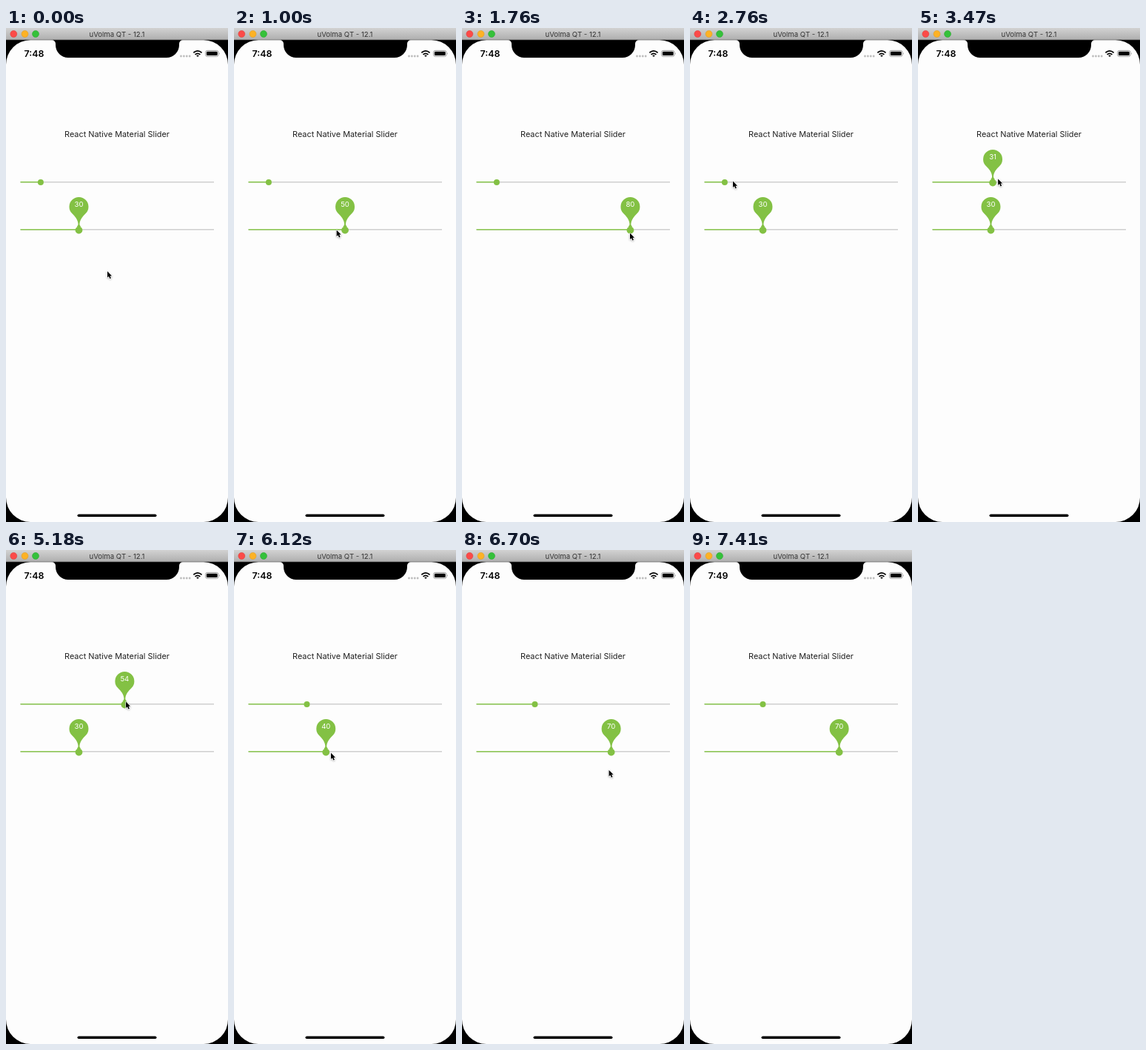
An HTML page for the animation above (8470 ms loop, 300 by 666 pixels).

```html
<!DOCTYPE html>
<html lang="en">
<head>
<meta charset="utf-8">
<title>Slider demo</title>
<style>
  html, body { margin: 0; width: 100%; height: 100%; overflow: hidden; background: #000; }
  svg { display: block; width: 100vw; height: 100vh; }
  text { font-family: Inter, Roboto, sans-serif; text-anchor: middle; }
  .rail { stroke: #cfcfcf; stroke-width: 1.5; }
  .fill { stroke: #8bc751; stroke-width: 1.6; }
  .green { fill: #83c144; }
  .value { font-size: 9.6px; fill: #fff; }
</style>
</head>
<body>
<svg viewBox="0 0 300 666">
  <defs>
    <linearGradient id="bar" x2="0" y2="1">
      <stop offset="0" stop-color="#d2d2d2"/>
      <stop offset="1" stop-color="#aeaeae"/>
    </linearGradient>
    <filter id="shade" x="-80%" y="-50%" width="260%" height="220%">
      <feDropShadow dx="0" dy="0.8" stdDeviation="0.8" flood-opacity="0.35"/>
    </filter>
    <path id="pin" class="green" d="M-9.2-21.6A13 13 0 1 1 9.2-21.6C4.6-17 1.5-13.5.9-7.5C.9-6 1.8-4.8 3-3.4H-3C-1.8-4.8-.9-6-.9-7.5C-1.5-13.5-4.6-17-9.2-21.6Z"/>
  </defs>

  <rect width="300" height="666"/>
  <rect width="300" height="16" fill="url(#bar)"/>
  <rect y="15.5" width="300" height="0.7" fill="#777"/>
  <g stroke-width="0.5">
    <circle cx="10.3" cy="8" r="4.5" fill="#fc4a48" stroke="#d93835"/>
    <circle cx="25.5" cy="8" r="4.5" fill="#fdb225" stroke="#dc981c"/>
    <circle cx="40" cy="8" r="4.5" fill="#35c13a" stroke="#27a22c"/>
  </g>
  <text x="150" y="11.6" font-size="9.6" fill="#333">uVolma QT - 12.1</text>

  <path fill="#fdfdfd" d="M0 49.3A33 33 0 0 1 33 16.3H62A5 5 0 0 1 67 21.3V23A17 17 0 0 0 84 40H217A17 17 0 0 0 234 23V21.3A5 5 0 0 1 239 16.3H267A33 33 0 0 1 300 49.3V633A33 33 0 0 1 267 666H33A33 33 0 0 1 0 633Z"/>
  <rect x="96.5" y="655.5" width="107" height="3.6" rx="1.8"/>

  <text id="clock" x="37.9" y="39.1" font-size="12.4" font-weight="600">7:48</text>
  <g fill="#bdbdbd">
    <circle cx="236.5" cy="38" r="1.4"/><circle cx="240.4" cy="38" r="1.4"/>
    <circle cx="244.3" cy="38" r="1.4"/><circle cx="248.2" cy="38" r="1.4"/>
  </g>
  <g fill="none" stroke="#000" stroke-width="1.8">
    <path d="M253.4 33.4Q259 28.3 264.6 33.4"/>
    <path d="M255.6 35.9Q259 32.8 262.4 35.9"/>
  </g>
  <path d="M257.2 37.2Q259 35.7 260.8 37.2L259 39.1Z"/>
  <rect x="269.6" y="30.4" width="17.4" height="8" rx="2.4" fill="none" stroke="#8a8a8a" stroke-width="0.8"/>
  <rect x="270.9" y="31.7" width="14.8" height="5.4" rx="1.3"/>
  <path d="M288 33Q289.4 34.4 288 35.8Z" fill="#8a8a8a"/>

  <text x="150" y="146.7" font-size="10.9" fill="#222">React Native Material Slider</text>

  <g id="top" transform="translate(0 207.7)"></g>
  <g id="low" transform="translate(0 271.7)"></g>

  <g id="cursor" filter="url(#shade)">
    <path transform="translate(0 .6) scale(.88)" d="M0 0V9.6L2.2 7.6L3.8 11.3L5.6 10.5L4 6.9H6.9Z" stroke="#fff" stroke-width="1.3" stroke-linejoin="round" paint-order="stroke"/>
  </g>
</svg>
<script>
const LOOP = 8470, START = 180, TICK = 58.78;
const ORIGIN = 21.1, UNIT = 2.579;
const el = id => document.getElementById(id);
const clamp = (v, lo = 0, hi = 1) => Math.max(lo, Math.min(hi, v));
const ease = p => p * p * (3 - 2 * p);

// Pointer glides: start, end, then the place reached; it rests in between.
const glides = [
  [121, 590, 97, 270],      // to the lower knob
  [701, 1500, 227, 276],    // drag right
  [1830, 2400, 106, 272],   // and back
  [2531, 2760, 58, 206],    // to the upper knob
  [2820, 2940, 44, 206],
  [3120, 4000, 226.5, 197], // drag right
  [4060, 4530, 167, 203],   // and back in steps
  [4760, 5180, 162, 204],
  [5200, 5420, 104.7, 207],
  [5420, 5640, 100, 276],   // to the lower knob
  [5740, 6120, 131, 273],   // drag right
  [6120, 6500, 205.5, 283],
  [6560, 6780, 196, 301],   // leave
  [6800, 7350, -12, -16]
];
const lowDrags = [[701, 2531], [5700, 6560]];
const topDrags = [[3060, 5420]];

function pointer(t) {
  let x = 137, y = 327.5;
  for (const [from, to, gx, gy] of glides) {
    const e = ease(clamp((t - from) / (to - from)));
    x += (gx - x) * e;
    y += (gy - y) * e;
  }
  return [x, y];
}

// Pointer x while dragging, or where the latest drag left it.
function dragX(drags, t) {
  const [from, to] = drags.filter(d => d[0] <= t).pop() || drags[0];
  return pointer(clamp(t, from, to))[0];
}

const lowValue = t => Math.round((dragX(lowDrags, t) - ORIGIN) / UNIT / 10) * 10;
const topValue = t => Math.max(10, Math.round(81 + (dragX(topDrags, t) - 226.5) * 0.4186));

function slider(id) {
  const g = el(id);
  g.innerHTML = `<path class="rail" d="M19.5 0H281"/><path class="fill"/>
    <g><circle class="green"/><g><use href="#pin"/><text class="value" y="-30.4"></text></g></g>`;
  const fill = g.querySelector(".fill"), knob = g.querySelector("g");
  const dot = g.querySelector("circle"), bubble = knob.querySelector("g");
  const label = g.querySelector("text");
  return (value, open) => {
    const x = ORIGIN + UNIT * value;
    fill.setAttribute("d", `M19.5 0H${x}`);
    knob.setAttribute("transform", `translate(${x} 0)`);
    dot.setAttribute("r", 4 + 0.9 * open);
    dot.setAttribute("cy", 0.3 + 0.6 * open);
    bubble.setAttribute("transform", `scale(${open})`);
    bubble.setAttribute("visibility", open > 0 ? "visible" : "hidden");
    label.textContent = value;
  };
}

const drawTop = slider("top"), drawLow = slider("low");

function draw(ms) {
  const raw = ms % LOOP;
  const t = raw < START ? 0 : START + Math.floor((raw - START) / TICK + 0.15) * TICK;
  const open = clamp((t - 2860) / 120) * clamp((5570 - t) / 120);
  drawTop(topValue(t), open);
  drawLow(lowValue(t), 1);
  el("cursor").setAttribute("transform", `translate(${pointer(t)})`);
  el("clock").textContent = t < 7000 ? "7:48" : "7:49";
}

const begin = performance.now();
function tick() {
  draw(performance.now() - begin);
  requestAnimationFrame(tick);
}
tick();
</script>
</body>
</html>
```
